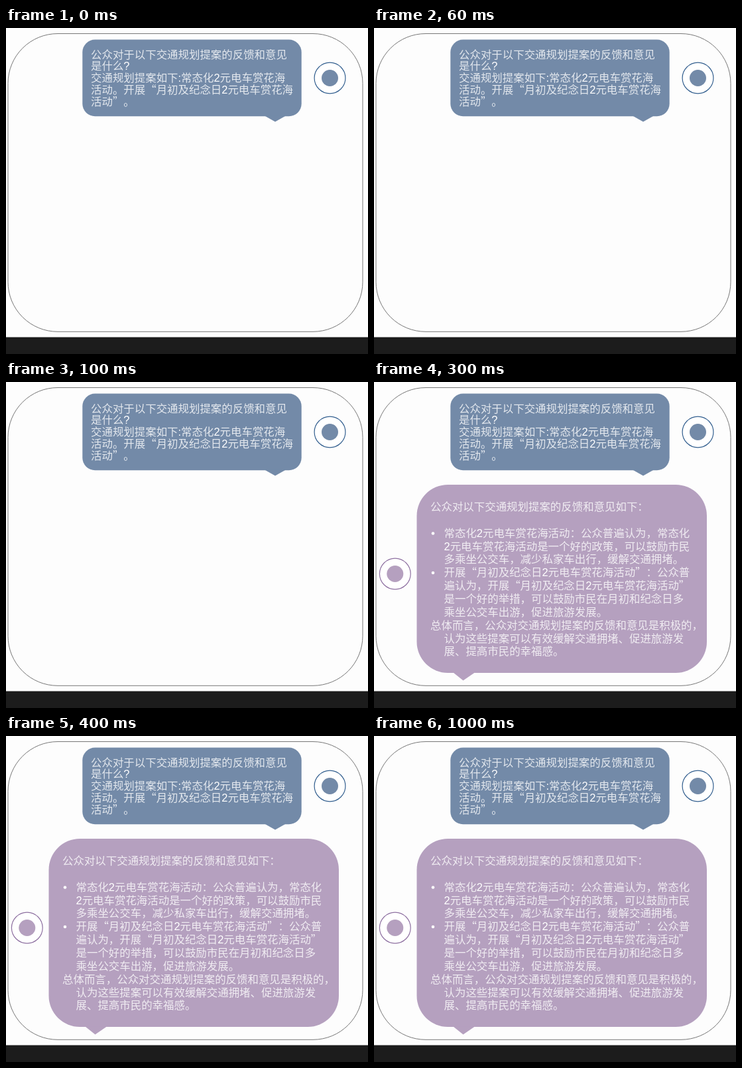
Recreate the animation shown at these times as an HTML page. Size 546x492 px, loop 1.4 s.

```html
<!DOCTYPE html>
<html lang="zh-CN">
<head>
<meta charset="utf-8">
<title>问答气泡</title>
<style>
  html, body { margin: 0; width: 100%; height: 100%; overflow: hidden; background: #fdfdfd; }
  svg { display: block; width: 546px; height: 492px; }
  text {
    font: 300 16.45px "Noto Sans CJK SC", "Noto Sans CJK", sans-serif;
    text-spacing-trim: space-all;
    fill: #fff;
    fill-opacity: .8;
  }
  .latin { font-family: "Liberation Sans", sans-serif; font-weight: 400; fill-opacity: 1; }
  .question { fill: #738aa8; }
  .answer { fill: #b5a0bf; }
  .ring { fill: #fff; stroke-width: 1.2; }
</style>
</head>
<body>
<svg viewBox="0 0 546 492" lang="zh-CN">
  <rect width="546" height="492" fill="#fdfdfd"/>
  <rect x="3" y="8.5" width="535" height="449.8" rx="75" fill="none" stroke="#777"/>
  <rect y="466.6" width="546" height="26" fill="#1c1c1c"/>

  <g id="question">
    <rect class="question" x="115.3" y="17.6" width="330.4" height="115.6" rx="19"/>
    <path class="question" d="M390 132.5L406 141.5L422 132.5Z"/>
    <circle class="ring" cx="488.5" cy="75.5" r="23.4" stroke="#335f8f"/>
    <circle class="question" cx="488.5" cy="75.5" r="12.5"/>
  </g>

  <g id="answer">
    <rect class="answer" x="64.5" y="155" width="437.5" height="284" rx="47"/>
    <path class="answer" d="M119.5 438.5L134.5 450.5L152 438.5Z"/>
    <circle class="ring" cx="31.8" cy="289.5" r="23.4" stroke="#8e70a1"/>
    <circle class="answer" cx="31.8" cy="289.5" r="12.5"/>
    <circle cx="89" cy="228.5" r="2.3" fill="#fff"/>
    <circle cx="89" cy="288" r="2.3" fill="#fff"/>
  </g>
</svg>
<script>
const LOOP = 1400, REPLY_AT = 300;
const SVG = "http://www.w3.org/2000/svg";

const question = [
  "公众对于以下交通规划提案的反馈和意见",
  "是什么?",
  "交通规划提案如下:常态化2元电车赏花海",
  "活动。开展“月初及纪念日2元电车赏花海",
  "活动”。"
];

// A leading ">" marks an indented line.
const answer = [
  "公众对以下交通规划提案的反馈和意见如下：",
  "",
  ">常态化2元电车赏花海活动：公众普遍认为，常态化",
  ">2元电车赏花海活动是一个好的政策，可以鼓励市民",
  ">多乘坐公交车，减少私家车出行，缓解交通拥堵。",
  ">开展“月初及纪念日2元电车赏花海活动”：公众普",
  ">遍认为，开展“月初及纪念日2元电车赏花海活动”",
  ">是一个好的举措，可以鼓励市民在月初和纪念日多",
  ">乘坐公交车出游，促进旅游发展。",
  "总体而言，公众对交通规划提案的反馈和意见是积极的，",
  ">认为这些提案可以有效缓解交通拥堵、促进旅游发",
  ">展、提高市民的幸福感。"
];

function add(parent, tag, attrs, content = "") {
  const node = document.createElementNS(SVG, tag);
  for (const key in attrs) node.setAttribute(key, attrs[key]);
  node.textContent = content;
  return parent.appendChild(node);
}

function writeLines(group, lines, left, baseline, pitch) {
  lines.forEach((line, i) => {
    const indent = line.startsWith(">") ? 20.5 : 0;
    const text = add(group, "text", { x: left + indent, y: baseline + i * pitch });
    for (const run of line.replace(">", "").split(/([0-9:?]+)/)) {
      if (run) add(text, "tspan", /^[0-9:?]/.test(run) ? { class: "latin" } : {}, run);
    }
  });
}

const reply = document.getElementById("answer");
writeLines(document.getElementById("question"), question, 128, 45.5, 17.8);
writeLines(reply, answer, 85, 194, 19.85);

reply.animate([
  { opacity: 0, offset: 0, easing: "step-end" },
  { opacity: 1, offset: REPLY_AT / LOOP },
  { opacity: 1, offset: 1 }
], { duration: LOOP, iterations: Infinity });
</script>
</body>
</html>
```
